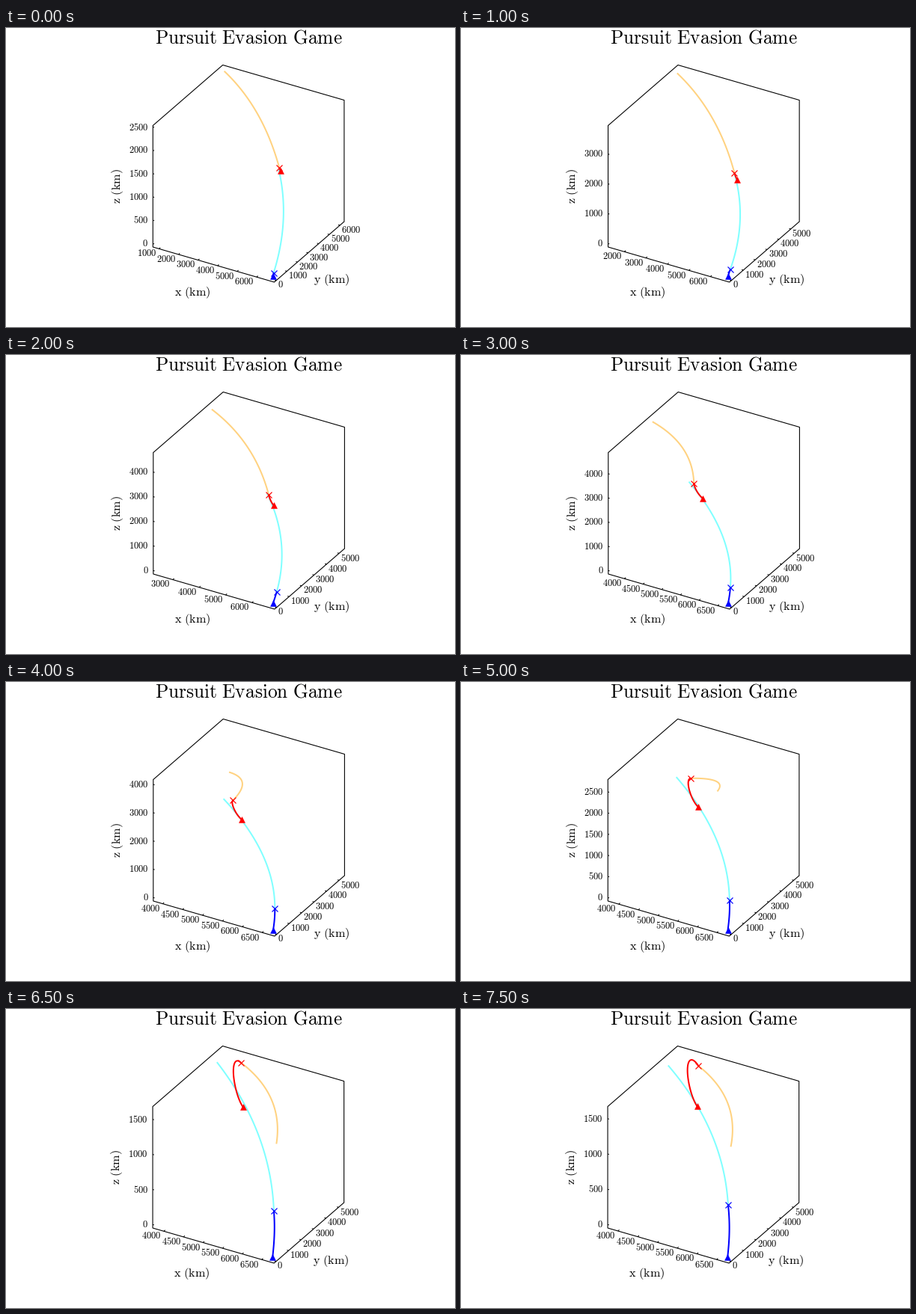
A matplotlib script for the animation above (8 s loop, 600 by 400 pixels).

```python
import numpy as np
import matplotlib.pyplot as plt
from matplotlib.animation import FuncAnimation

plt.rcParams["mathtext.fontset"] = "cm"
PX = 0.72  # points per pixel at 100 dpi
STEPS = 16
ORBIT = 6740  # km
BULGE = 650  # how far gravity bends a forecast outwards, km

fig = plt.figure(figsize=(6, 4), dpi=100, facecolor="white")
ax = fig.add_axes([0, 0, 1, 1])

# Screen position of the box corner and its three edges
ORIGIN = np.array([196.5, 293.0])
EDGES = np.array([[162.2, 47.0], [93.4, -81.0], [0.0, -162.5]])

# Evader path: a smooth curve through five positions, every fourth step
EVADER = np.polyfit(np.arange(-1, 16, 4), [
    (4335, 5124, 962), (4105, 5238, 1190), (4050, 5260, 1450),
    (4210, 5070, 1608), (4440, 4890, 1588)], 4)


def evader(t):
    return np.vander(np.atleast_1d(t), 5) @ EVADER


def pursuer(t):
    s = np.atleast_1d(t) + 1.0
    return np.column_stack([6728 - 28 * s - 0.6 * s ** 2, 121 * s,
                            35 * s ** 0.83])


def pursuer_goal(n):
    return np.array([3800 + 3.1 * (n - 12) ** 2,
                     5283 - 8.0 * (n - 4.5) ** 2,
                     1580 - 3.4 * (n - 13.3) ** 2])


def evader_goal(n):
    """The evader turns its orbit at a steady rate, then coasts."""
    up = evader(n)[0]
    up = up / np.linalg.norm(up)
    east = np.array([-up[1], up[0], 0]) / np.hypot(up[0], up[1])
    north = np.cross(up, east)
    turn = np.radians(min(26.3 + 13.2 * n, 177.5))
    reach = 3690 + 580 * min(n / 13, 1) ** 2
    return (np.sqrt(ORBIT ** 2 - reach ** 2) * up
            + reach * (np.cos(turn) * east + np.sin(turn) * north))


def forecast(start, goal):
    mid = (start + goal) / 2
    mid = mid * (1 + BULGE / np.linalg.norm(mid))
    t = np.linspace(0, 1, 80)[:, None]
    return (1 - t) ** 2 * start + 2 * t * (1 - t) * mid + t ** 2 * goal


def line(pts, color, width):
    pts = np.asarray(pts)
    ax.plot(pts[:, 0], pts[:, 1], color=color, lw=width * PX, snap=False,
            solid_capstyle="butt", solid_joinstyle="miter")


def label(x, y, text, size, **kw):
    text = text.replace(" ", r"\ ")
    ax.text(x, y, rf"$\mathrm{{{text}}}$", fontsize=size * PX, **kw)


def draw_axes(low, high):
    ex, ey, ez = EDGES
    x_end, top = ORIGIN + ex, ORIGIN + ez
    line([x_end, ORIGIN, top, top + ey, top + ey + ex, x_end + ey, x_end],
         "black", 1.1)
    # base, tick mark, label offset, alignment
    sides = [(ORIGIN, (1.8, -1.6), (-3, 6.4), "right"),
             (x_end, (-2.2, -0.6), (1.6, 6.2), "left"),
             (ORIGIN, (1.8, 0.5), (-6.3, 0.3), "right")]
    for k, (base, mark, shift, align) in enumerate(sides):
        span = high[k] - low[k]
        step = 500 if k != 1 and span < 3300 else 1000
        for i in range(int(np.ceil(low[k] / step)), int(high[k] // step) + 1):
            p = base + EDGES[k] * (i * step - low[k]) / span
            line([p, p + mark], "black", 1)
            label(*(p + shift), str(i * step), 12.5, ha=align, va="center")


def draw_craft(path, color):
    line(path, color, 2)
    ax.plot(*path[0], "^", color=color, ms=7.5 * PX, mew=0.5 * PX)
    ax.plot(*path[-1], "x", color=color, ms=8 * PX, mew=1.2 * PX)


def draw(n):
    ax.clear()
    ax.axis("off")

    blue = pursuer(np.linspace(-1, n, 80))
    red = evader(np.linspace(-1, n, 80))
    cyan = forecast(blue[-1], pursuer_goal(n))
    orange = forecast(red[-1], evader_goal(n))

    # The axes fit the data with a 3% margin
    every = np.vstack([blue, red, cyan, orange])
    low, high = every.min(axis=0), every.max(axis=0)
    pad = 0.03 * (high - low)
    low, high = low - pad, high + pad

    def project(points):
        return ORIGIN + (points - low) / (high - low) @ EDGES

    # The layout moves a little with the widest z label
    dx = 0.25 * (high[2] // 1000) - 0.7
    ax.set_xlim(-dx, 600 - dx)
    ax.set_ylim(400, 0)

    draw_axes(low, high)
    label(324.4, 20.8, "Pursuit Evasion Game", 25.4, ha="center", va="baseline")
    label(249, 353.8, "x (km)", 16.2, ha="center", va="center")
    label(435, 337.3, "y (km)", 16.2, ha="center", va="center")
    label(148.8, 211.5, "z (km)", 16.2, ha="center", va="center", rotation=90)

    line(project(cyan), "#80ffff", 2)
    line(project(orange), "#ffd280", 2)
    draw_craft(project(blue), "blue")
    draw_craft(project(red), "red")
    return []


anim = FuncAnimation(fig, draw, frames=STEPS, init_func=lambda: [],
                     interval=500, repeat=True, repeat_delay=0)
plt.show()
```
